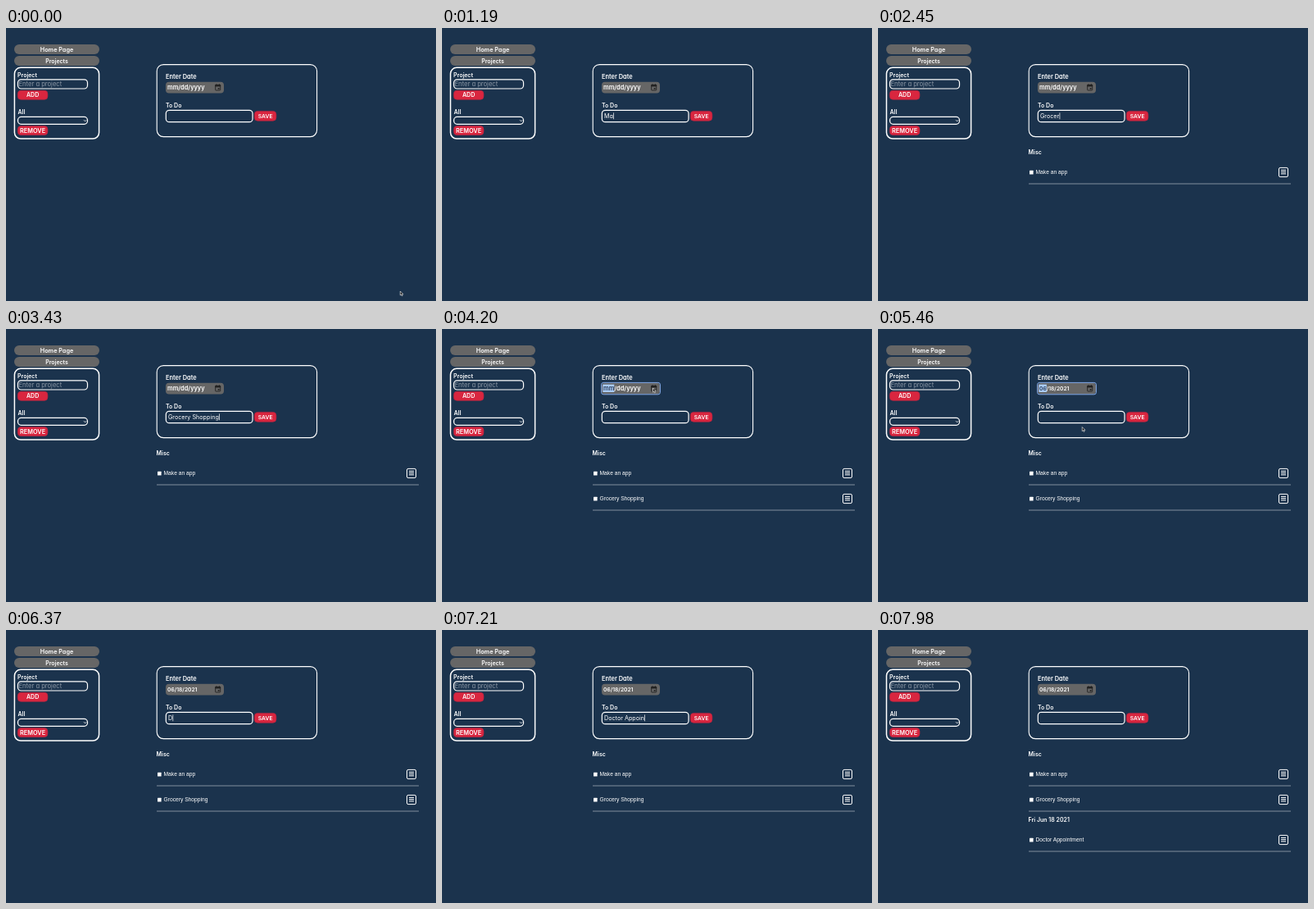
An HTML page that plays this animation: 525x333 px, repeating every 8 s.

```html
<!DOCTYPE html>
<html lang="en">
<head>
<meta charset="utf-8">
<title>To-do planner</title>
<style>
  html, body { margin: 0; width: 100%; height: 100%; overflow: hidden; background: #1b334d; }
  svg { display: block; }
  text { white-space: pre; fill: #fff; font: 600 7px Inter, sans-serif; font-feature-settings: "cv11"; }
  .plain { font: 6.7px "Liberation Sans", Arial, sans-serif; }
  .cal { font: 500 4.6px Roboto, sans-serif; fill: #222; }
</style>
</head>
<body>
<svg id="stage" width="525" height="333" viewBox="0 0 525 333"></svg>
<script>
const LOOP = 8000;
const WHITE = '#fff', RED = '#d9263f', GREY = '#666', BLUE = '#0b68e4';
const stage = document.getElementById('stage');

function add(parent, tag, attrs) {
  const el = document.createElementNS('http://www.w3.org/2000/svg', tag);
  for (const key in attrs) el.setAttribute(key, attrs[key]);
  return parent.appendChild(el);
}
const group = (parent = stage) => add(parent, 'g', {});
const box = (parent, x, y, width, height, rx, fill, attrs = {}) =>
  add(parent, 'rect', { x, y, width, height, rx, fill, ...attrs });
const outline = (parent, x, y, w, h, r, line = 1.2, stroke = WHITE) =>
  box(parent, x, y, w, h, r, 'none', { stroke, 'stroke-width': line });
const path = (parent, d, stroke, line = 1, fill = 'none') =>
  add(parent, 'path', { d, stroke, 'stroke-width': line, fill });

function label(parent, str, x, y, style = '', attrs = {}) {
  const el = add(parent, 'text', { x, y, style, ...attrs });
  el.textContent = str;
  return el;
}
const centred = (parent, str, x, y, style = '', attrs = {}) =>
  label(parent, str, x, y, style, { 'text-anchor': 'middle', ...attrs });
const show = (el, on) => { el.style.display = on ? '' : 'none'; };

function redButton(str, x, y, w, h, size) {
  box(stage, x, y, w, h, 4, RED, { stroke: '#b32542', 'stroke-width': 0.7 });
  centred(stage, str, x + w / 2, y + h / 2 + 2.5, `font-size:${size}px`);
}

// Sidebar
box(stage, 10, 20, 104, 12, 6, GREY);
centred(stage, 'Home Page', 62, 28.6, 'font-size:7.25px');
box(stage, 10, 34, 104, 12, 6, GREY);
centred(stage, 'Projects', 62, 42.6);
outline(stage, 10.4, 48.3, 103.2, 86.8, 7.5, 1.5);
label(stage, 'Project', 14, 59.5);
outline(stage, 14.5, 62.8, 85, 11.2, 4);
label(stage, 'Enter a project', 15.5, 70.9, 'font-size:7.6px;font-weight:400;fill:#8b97a5');
redButton('ADD', 14.3, 76.3, 36.6, 11, 7);
label(stage, 'All', 14.5, 105);
outline(stage, 14.5, 108.4, 85, 8.9, 4);
path(stage, 'M95 112.2l1.6 1.7 1.6-1.7', WHITE, 0.8);
redButton('REMOVE', 14.3, 119.6, 36.6, 11, 7.3);

// Entry form
outline(stage, 184.2, 44.6, 195.4, 88, 8, 1.1);
label(stage, 'Enter Date', 195, 62.4, 'font-size:7.4px');
box(stage, 195, 65.8, 71, 13.8, 4, GREY);
const ring = outline(stage, 194.6, 65.4, 71.8, 14.4, 2.5, 1, '#86acea');
const mark = box(stage, 196.3, 67.6, 14, 9.4, 0, '#a9cbfa');
const dateText = label(stage, '', 197, 75);
const datePart = add(dateText, 'tspan', {});
const dateRest = add(dateText, 'tspan', {});
outline(stage, 255.7, 69.4, 6, 6.6, 0.6, 0.9, '#222');
box(stage, 255.3, 69, 6.8, 2.4, 0.5, '#222');
path(stage, 'M257 68.2v1.5M260.4 68.2v1.5', '#222', 0.9);
box(stage, 258.7, 73, 1.8, 1.8, 0, '#222');
label(stage, 'To Do', 195, 97);
outline(stage, 195.3, 100.3, 105.8, 14.4, 4);
const typed = label(stage, '', 198, 109.7, 'font-size:7.2px;font-weight:400');
const caret = box(stage, 0, 103.4, 0.7, 7.8, 0, WHITE);
redButton('SAVE', 303.3, 101.4, 26.6, 11.8, 6.8);

// Saved list
function item(str, y, heading, headingY) {
  const g = group();
  if (heading) label(g, heading, 183.6, headingY);
  box(g, 185, y - 2.2, 4.6, 4.6, 0.5, WHITE);
  label(g, str, 192.5, y + 2.3, '', { class: 'plain' });
  outline(g, 489.5, y - 5.6, 11, 11.2, 1.6, 1);
  path(g, [-2.6, -0.4, 1.8].map(d => `M492 ${y + d}h6`).join(''), WHITE, 1);
  path(g, `M184 ${y + 14}h320`, '#8d99a6', 0.9);
  return g;
}

const entries = [
  { text: 'Make an app', start: 1090, step: 66, saved: 1820, list: item('Make an app', 176, 'Misc', 154.2) },
  { text: 'Grocery Shopping', start: 2040, step: 78, saved: 3480, list: item('Grocery Shopping', 207) },
  { text: 'Doctor Appointment', start: 6340, step: 68, saved: 7650,
    list: item('Doctor Appointment', 256, 'Fri Jun 18 2021', 233.6) }
];

// Month picker, opening at 30 May
const COL = 203.5, ROW = 110.4, PITCH = 9.77;
const picker = group();
box(picker, 195, 80, 76, 97.8, 0.5, WHITE, { stroke: '#c5c9ce', 'stroke-width': 0.4 });
label(picker, 'June 2021', 198.4, 89.4, 'font-weight:700', { class: 'cal' });
path(picker, 'M220.4 87.1h3l-1.5 1.8z', 'none', 0, '#222');
path(picker, 'M251 91.3v-6.4M248.6 87.3l2.4-2.6 2.4 2.6M262.3 84.8v6.4M259.9 88.8l2.4 2.6 2.4-2.6', '#666', 0.7);
[...'SMTWTFS'].forEach((d, i) => centred(picker, d, COL + i * PITCH, 102, '', { class: 'cal' }));
const hover = box(picker, 0, 0, 9.8, 9.8, 0.6, '#b9d5fb');
box(picker, COL + 3 * PITCH - 4.9, ROW + 2 * PITCH - 4.9, 9.8, 9.8, 0.6, BLUE);
for (let i = 0; i < 42; i++) {
  const day = i - 1;
  const outside = day < 1 || day > 30;
  const num = day < 1 ? day + 31 : day > 30 ? day - 30 : day;
  const fill = day === 16 ? WHITE : outside ? '#858585' : '#222';
  centred(picker, num, COL + (i % 7) * PITCH, ROW + Math.floor(i / 7) * PITCH + 1.6, `fill:${fill}`, { class: 'cal' });
}
centred(picker, 'Today', 257.8, 171.9, `fill:${BLUE}`, { class: 'cal' });

// Pointers
const arrow = path(stage, 'M0 0v5l1.2-1 .8 1.8 .9-.4-.8-1.7h1.6z', WHITE, 0.6, '#111');
const beam = path(stage, 'M-1.2-3h2.4M0-3v6M-1.2 3h2.4', '#dfe5ec', 0.6);

// Pointer stops: time, x, y
const stops = [
  [0, 481.3, 321], [120, 481.3, 321], [640, 245, 107], [3560, 245, 107],
  [4060, 257.5, 72], [4480, 257.5, 72], [4900, 253, 130.6],
  [5260, 253, 130.6], [5680, 245, 107], [LOOP, 245, 107]
];
function pointerAt(t) {
  const i = stops.findIndex(s => s[0] > t);
  const [t0, x0, y0] = stops[i - 1], [t1, x1, y1] = stops[i];
  const u = (t - t0) / (t1 - t0);
  const e = u * u * (3 - 2 * u);
  return [x0 + (x1 - x0) * e, y0 + (y1 - y0) * e];
}
const within = (t, a, b) => t >= a && t < b;

function drawDate(t) {
  const focused = within(t, 4130, 5800);
  const chosen = t >= 5200;
  datePart.textContent = chosen ? '06' : 'mm';
  dateRest.textContent = chosen ? '/18/2021' : '/dd/yyyy';
  dateText.style.fontSize = chosen ? '6.7px' : '7.4px';
  datePart.style.fill = focused ? '#26384e' : WHITE;
  mark.setAttribute('width', chosen ? 9.6 : 14);
  show(ring, focused);
  show(mark, focused);
}

function drawEntry(t) {
  const active = entries.find(e => within(t, e.start, e.saved));
  const count = active ? Math.floor((t - active.start) / active.step) + 1 : 0;
  typed.textContent = active ? active.text.slice(0, count) : '';
  const end = count ? typed.getComputedTextLength() : 0;
  caret.setAttribute('x', 198.3 + end);
  show(caret, within(t, 770, 4130) && !within(t, 3480, 4130) || within(t, 5800, 7650));
  entries.forEach(e => show(e.list, t >= e.saved));
}

function drawPointer(t) {
  const [x, y] = pointerAt(t);
  const visible = t < 980 || within(t, 3560, 6060);
  const open = within(t, 4270, 5200);
  const overInput = !open && x > 195 && x < 301 && y > 100 && y < 115;
  for (const el of [arrow, beam]) el.setAttribute('transform', `translate(${x} ${y})`);
  show(arrow, visible && !overInput);
  show(beam, visible && overInput);

  const col = Math.round((x - COL) / PITCH);
  const row = Math.round((y + 0.8 - ROW) / PITCH);
  hover.setAttribute('x', COL + col * PITCH - 4.9);
  hover.setAttribute('y', ROW + row * PITCH - 4.9);
  show(hover, row >= 0);
  show(picker, open);
}

function frame(now) {
  const t = now % LOOP;
  drawDate(t);
  drawEntry(t);
  drawPointer(t);
  requestAnimationFrame(frame);
}
frame(performance.now());
</script>
</body>
</html>
```
